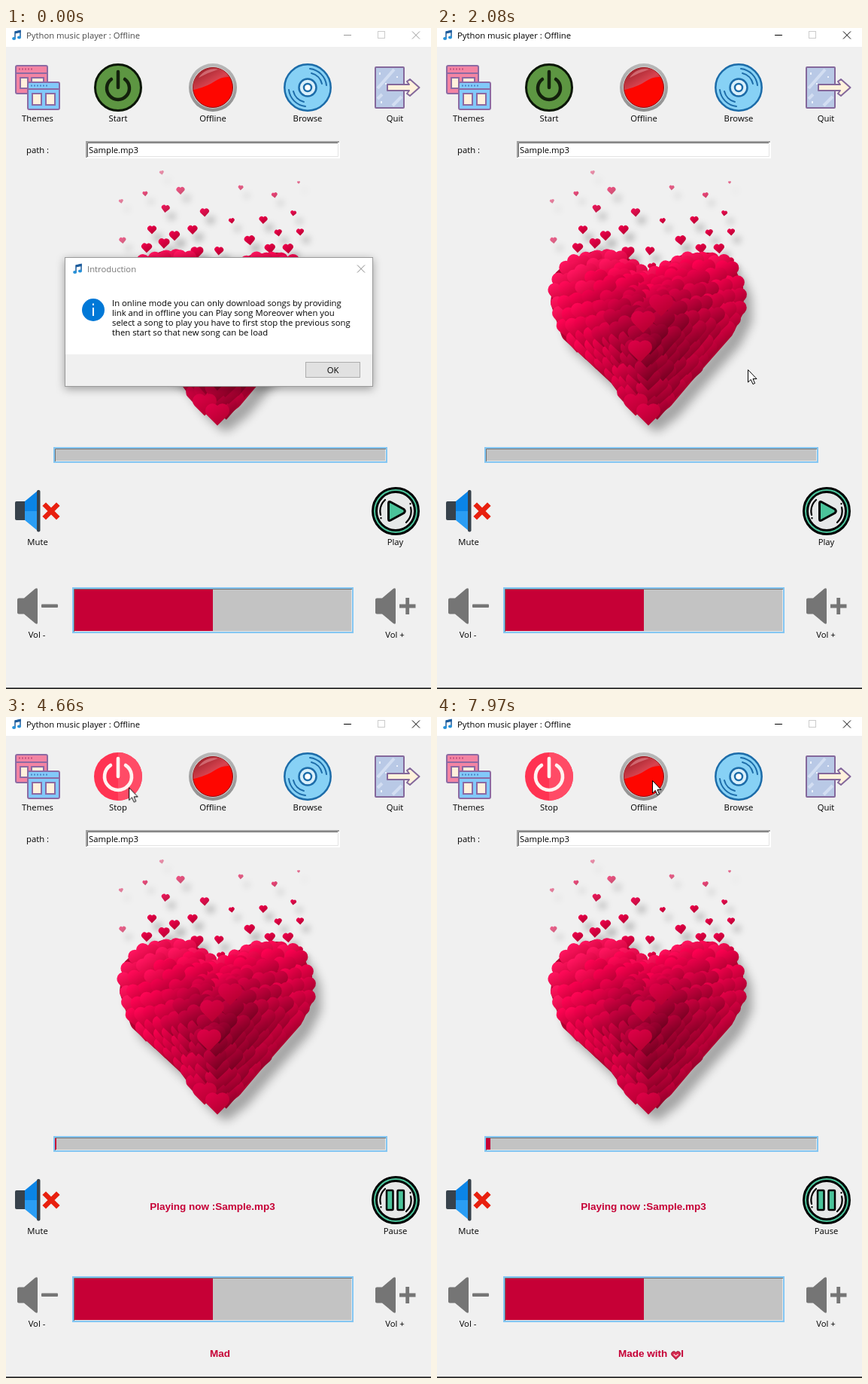
Write an HTML page with a canvas that moves like this. It is 565x877 px and loops after 8000 ms.

```html
<!DOCTYPE html>
<html lang="en">
<head>
<meta charset="utf-8">
<title>Python music player</title>
<style>
html, body { margin: 0; width: 100%; height: 100%; overflow: hidden; background: #f0f0f0; }
canvas, svg.stage { position: absolute; left: 0; top: 0; }
text { font: 11.3px "Open Sans", "Noto Sans", sans-serif; }
.mid { text-anchor: middle; }
.bold, #credit { font: bold 13.5px "Liberation Sans", Arial, sans-serif; fill: #c60036; color: #c60036; }
#credit { position: absolute; left: 284.5px; top: 836px; line-height: 17px; white-space: pre; transform: translateX(-50%); }
#credit svg { width: 14px; height: 13px; vertical-align: -4px; }
.wake { fill: currentColor; animation: wake 8s step-end infinite; }
.dialog { transform-origin: 282.5px 389.5px; animation: dismiss 8s step-end infinite; }
.frame { filter: drop-shadow(0 3px 6px rgba(0,0,0,.35)); }
.ok { animation: hover 8s step-end infinite; }
.cursor { animation: travel 8s linear infinite; }
@keyframes wake { 0% { color: var(--idle); } 24.1%, 100% { color: #000; } }
@keyframes hover {
  0% { fill: #e1e1e1; stroke: #adadad; }
  16.5%, 100% { fill: #e5f1fb; stroke: #0078d7; }
}
@keyframes dismiss {
  0% { opacity: 1; transform: none; }
  22.25% { opacity: .93; transform: scale(.995); }
  24.1% { opacity: .56; transform: scale(.98); }
  25% { opacity: .25; transform: scale(.965); }
  26%, 100% { opacity: 0; transform: scale(.95); }
}
@keyframes travel {
  0%, 3.37% { transform: translate(310px, 843px); }
  6.25% { transform: translate(338px, 765px); }
  9.4% { transform: translate(420px, 605px); }
  11.25% { transform: translate(441px, 530px); }
  13.4% { transform: translate(417px, 472px); }
  15.4% { transform: translate(408px, 464px); }
  19.25% { transform: translate(413px, 453px); }
  31.3% { transform: translate(413px, 453px); animation-timing-function: ease-in-out; }
  40.9%, 57.5% { transform: translate(150px, 91px); }
  60.4% { transform: translate(200px, 100px); }
  65% { transform: translate(395px, 104px); }
  68.1% { transform: translate(482px, 135px); }
  70% { transform: translate(487px, 145px); }
  72% { transform: translate(443px, 150px); }
  76.75%, 79.2% { transform: translate(392px, 148px); }
  88.6% { transform: translate(300px, 99px); }
  94.9% { transform: translate(288px, 86px); }
  99.6%, 100% { transform: translate(286px, 84px); }
}
</style>
</head>
<body>
<canvas id="art" width="565" height="877"></canvas>
<svg class="stage" width="565" height="877" viewBox="0 0 565 877">
  <defs>
    <g id="note">
      <path d="M4 10.500V2L11 .5V9" fill="none" stroke="#1d5c9c" stroke-width="1.500"/>
      <path d="M4 1.500 11.700 0V3L4 4.500z" fill="#1d5c9c"/>
      <ellipse cx="2.600" cy="11" rx="2.500" ry="2" fill="#2590d8"/>
      <ellipse cx="9.500" cy="9.500" rx="2.500" ry="2" fill="#2590d8"/>
    </g>
    <g id="speaker" fill="#757575">
      <path d="M0 15.500a2 2 0 0 1 2-2H9L24 .8Q27-1 27 2V46Q27 49 24 47L9 34.500H2a2 2 0 0 1-2-2z"/>
    </g>
    <g id="dial">
      <circle r="30.500" fill="#4bc39a" stroke="#000" stroke-width="3"/>
      <circle r="25.500" fill="#e6e8e8" stroke="#000" stroke-width="3"/>
      <path d="M-20 5A21 21 0 0 1-14-15M20-5A21 21 0 0 1 14 15M-19.500 9v.5M19.500-10v.5" fill="none" stroke="#000" stroke-width="2.200" stroke-linecap="round"/>
    </g>
    <linearGradient id="rim" x2="0" y2="1"><stop stop-color="#b9b9b9"/><stop offset="1" stop-color="#8d8d8d"/></linearGradient>
    <linearGradient id="gloss" x2="1" y2="1"><stop stop-color="#8e1820"/><stop offset=".6" stop-color="#d84450"/><stop offset="1" stop-color="#c81016"/></linearGradient>
  </defs>

  <!-- title bar -->
  <rect width="565" height="25" fill="#fff"/>
  <use href="#note" x="8" y="3"/>
  <text class="wake" style="--idle:#484848" x="27" y="14">Python music player : Offline</text>
  <g class="wake" style="--idle:#999;fill:none" stroke="currentColor">
    <path d="M449 9.500h10M540 4.500l10 10M550 4.500l-10 10"/>
  </g>
  <rect x="494.500" y="4.500" width="9" height="9" fill="none" stroke="#ccc"/>
  <rect y="875.300" width="565" height="2" fill="#222"/>

  <!-- themes -->
  <g stroke="#8c6aa3" stroke-width="2">
    <rect x="13" y="50" width="42" height="37" rx="2" fill="#f384a3"/>
    <path d="M13 60h42" /><path d="M17 54.500h20" stroke="#c34f7f" stroke-dasharray="2 2"/>
    <path d="M19 66h10v14H19zM34 66h16v14H34z" fill="#fff0dc"/>
    <rect x="29" y="72" width="42" height="36" rx="2" fill="#82c9fa"/>
    <path d="M29 81h42"/><path d="M33 76.500h22" stroke="#4e86c6" stroke-dasharray="2 2"/>
    <path d="M35 87h12v15H35zM53 87h12v15H53z" fill="#fff0dc"/>
  </g>
  <text class="mid" x="42" y="124">Themes</text>

  <!-- start / stop -->
  <g data-to="3420">
    <circle cx="149" cy="79" r="30.500" fill="#5d9642" stroke="#0b1607" stroke-width="3"/>
    <path d="M140 68A15 15 0 1 0 158 68M149 58V79" fill="none" stroke="#13200c" stroke-width="4.500" stroke-linecap="round"/>
    <text class="mid" x="149" y="124">Start</text>
  </g>
  <g data-from="3420">
    <circle cx="149" cy="79" r="32" fill="#ff3352"/>
    <path d="M149 47a32 32 0 0 1 0 64z" fill="#ff4b66"/>
    <path d="M139 64A18 18 0 1 0 159 64M149 55V79" fill="none" stroke="#fff2f0" stroke-width="4.600" stroke-linecap="round"/>
    <text class="mid" x="149" y="124">Stop</text>
  </g>

  <!-- offline -->
  <circle cx="275" cy="79" r="32" fill="url(#rim)"/>
  <circle cx="275" cy="79" r="28" fill="#d0d0d0"/>
  <circle cx="275" cy="79" r="26.500" fill="#fe0600" stroke="#8a1014"/>
  <path d="M249 82A26 26 0 0 1 297 65Q287 64 277 71T249 82z" fill="url(#gloss)"/>
  <path d="M256 66A24 24 0 0 1 282 55Q269 59 256 66z" fill="#e58e94" opacity=".6"/>
  <text class="mid" x="275" y="124">Offline</text>

  <!-- browse -->
  <g fill="none" stroke="#1c6ca9" stroke-width="2.500">
    <circle cx="401" cy="79" r="30.700" fill="#87d1f5"/>
    <circle cx="401" cy="79" r="11.500" fill="#d9effa"/>
    <circle cx="401" cy="79" r="5" fill="#fff"/>
    <path d="M404 54A25 25 0 0 1 426 76M406 60A19 19 0 0 1 420 74M398 104A25 25 0 0 1 376 82M396 98A19 19 0 0 1 382 84" stroke-width="2" stroke-linecap="round"/>
  </g>
  <text class="mid" x="401" y="124">Browse</text>

  <!-- quit -->
  <g stroke="#84689b" stroke-width="2" stroke-linejoin="round">
    <rect x="491" y="52" width="38" height="54" rx="1" fill="#b9c9e6"/>
    <path d="M494 80 516 55M494 94 500 88M514 103 526 91" stroke="#d3def2" stroke-width="4"/>
    <path d="M497 59v3M520 64v2M499 97v3M505 73v2" stroke="#edf2fb"/>
    <path d="M507 75h29l-3-4 4-3 12.500 11-12.500 11-4-3 3-4H507z" fill="#fff2dc"/>
  </g>
  <text class="mid" x="517" y="124">Quit</text>

  <!-- path entry -->
  <text x="27" y="166">path :</text>
  <rect x="106" y="150" width="338" height="23" fill="#fff"/>
  <path d="M106 172V150H443V152H108V172z" fill="#a0a0a0"/>
  <path d="M108.500 171V152.500H441" fill="none" stroke="#696969"/>
  <path d="M109 170.500H441.500V153" fill="none" stroke="#e3e3e3"/>
  <text x="110" y="166">Sample.mp3</text>

  <!-- song progress -->
  <rect x="64" y="557" width="442" height="19" fill="#c3c3c3" stroke="#84c6f2" stroke-width="2"/>
  <path d="M65.500 575V558.500H505" fill="none" stroke="#707070"/>
  <path d="M66 574.500H504.500V559" fill="none" stroke="#e6e6e6"/>
  <rect id="played" x="65" y="559" width="0" height="15" fill="#c60036"/>

  <!-- mute -->
  <path d="M12 630q0-2 2-2H25V653H14q-2 0-2-2z" fill="#37424c"/>
  <path d="M25 628 42 614V641H25z" fill="#0a84e6"/>
  <path d="M25 641H42V667L25 653z" fill="#2a9df4"/>
  <rect x="41" y="613" width="4.500" height="55.500" rx="2" fill="#37424c"/>
  <path d="M53 634 67 648M67 634 53 648" stroke="#e8200f" stroke-width="6.500" stroke-linecap="square"/>
  <text class="mid" x="42" y="686">Mute</text>

  <!-- play / pause -->
  <use href="#dial" x="518" y="641"/>
  <g data-to="3580">
    <path d="M508.500 630.500Q508.500 627.500 511.500 629L529 638.500Q531.500 641 529 643.500L511.500 653Q508.500 654.500 508.500 651.500z" fill="#4bc39a" stroke="#000" stroke-width="3" stroke-linejoin="round"/>
    <text class="mid" x="517.500" y="686">Play</text>
  </g>
  <g data-from="3580">
    <g fill="#4bc39a" stroke="#000" stroke-width="2.500">
      <rect x="506" y="628" width="8.500" height="26" rx="1"/>
      <rect x="520.500" y="628" width="8.500" height="26" rx="1"/>
    </g>
    <text class="mid" x="517.500" y="686">Pause</text>
    <text class="mid bold" x="274.500" y="654">Playing now :Sample.mp3</text>
  </g>

  <!-- volume -->
  <use href="#speaker" x="15" y="743"/>
  <rect x="47" y="764.500" width="22" height="4.500" rx="1" fill="#757575"/>
  <text class="mid" x="41" y="809">Vol -</text>
  <use href="#speaker" x="491" y="743"/>
  <path d="M523 767h21.500M533.700 756v22" stroke="#757575" stroke-width="4.800"/>
  <text class="mid" x="517" y="809">Vol +</text>
  <rect x="89" y="743" width="372" height="59" fill="#c3c3c3" stroke="#84c6f2" stroke-width="2"/>
  <path d="M90.500 801V744.500H460" fill="none" stroke="#707070"/>
  <path d="M91 800.500H459.500V745" fill="none" stroke="#e6e6e6"/>
  <rect x="91" y="745" width="184" height="55" fill="#c60036"/>

  <!-- introduction dialog -->
  <g class="dialog">
    <rect class="frame" x="78.500" y="304.500" width="409" height="171" fill="#fff" stroke="#9a9a9a"/>
    <rect x="79" y="433" width="408" height="42" fill="#f0f0f0"/>
    <use href="#note" x="89" y="313"/>
    <text x="108" y="324" fill="#777">Introduction</text>
    <path d="M467 314.500l10 10M477 314.500l-10 10" stroke="#888"/>
    <circle cx="116" cy="374" r="15" fill="#0078d7"/>
    <path d="M116 371V382M116 365.500V368" stroke="#fff" stroke-width="2"/>
    <text x="141" y="369">In online mode you can only download songs by providing</text>
    <text x="141" y="382">link and in offline you can Play song Moreover when you</text>
    <text x="141" y="395">select a song to play you have to first stop the previous song</text>
    <text x="141" y="408">then start so that new song can be load</text>
    <rect class="ok" x="398.500" y="443.500" width="72" height="20"/>
    <text class="mid" x="434.500" y="458">OK</text>
  </g>
</svg>

<div id="credit"><span id="typed"></span><svg id="gift" viewBox="0 0 14 13"><path d="M7 12.500 1.500 7A3 3 0 0 1 7 3 3 3 0 0 1 12.500 7z" fill="#d5294f" stroke="#8c1a36" stroke-width=".8"/><path d="M4 5.500 7 8l3-2.500" fill="none" stroke="#ffd9de" stroke-width="1.300"/></svg><span id="tail">I</span></div>

<svg class="stage" width="565" height="877">
  <g class="cursor"><path data-from="270" d="M.5.500V17l3.800-3.600L7 19.500l2.600-1.100L7 12.500h5z" fill="#fff" stroke="#000"/></g>
</svg>

<script>
const byId = id => document.getElementById(id);
const ctx = byId('art').getContext('2d');

let seed = 11;
const random = () => (seed = (seed * 16807) % 2147483647) / 2147483647;

function heart(x, y, size, lightness, depth, angle = 0) {
  const c = size * .207, r = size * .293, q = size * .04;
  ctx.save();
  ctx.translate(x, y);
  ctx.rotate(angle);
  const shade = ctx.createLinearGradient(-size * .3, -size * .4, size * .25, size * .45);
  shade.addColorStop(0, `hsl(341 100% ${lightness}%)`);
  shade.addColorStop(1, `hsl(344 100% ${lightness - depth}%)`);
  ctx.fillStyle = shade;
  ctx.beginPath();
  ctx.arc(-c, q - c, r, Math.PI * .75, Math.PI * 1.75);
  ctx.arc(c, q - c, r, Math.PI * 1.25, Math.PI * 2.25);
  ctx.lineTo(0, q + 2 * c);
  ctx.fill();
  ctx.restore();
}

function setShadow(alpha, blur, dx, dy) {
  Object.assign(ctx, { shadowColor: `rgba(0,0,0,${alpha})`, shadowBlur: blur, shadowOffsetX: dx, shadowOffsetY: dy });
}

const outline = [
  [281, 511], [262, 494], [240, 464], [210, 436], [176, 405], [162, 364], [166, 332], [182, 317],
  [212, 306], [245, 312], [266, 328], [288, 338], [305, 324], [330, 311], [360, 309], [385, 321],
  [396, 345], [397, 374], [383, 402], [360, 428], [330, 462], [303, 494]
];

// Evenly spaced points along the outline, shrunk towards its middle.
function ring(scale, gap) {
  const points = [];
  let carry = 0;
  outline.forEach(([ax, ay], i) => {
    const [bx, by] = outline[(i + 1) % outline.length];
    const length = Math.hypot(bx - ax, by - ay) * scale;
    for (; carry < length; carry += gap) {
      const k = carry / length;
      points.push([278 + (ax + (bx - ax) * k - 278) * scale, 400 + (ay + (by - ay) * k - 400) * scale]);
    }
    carry -= length;
  });
  return points.sort((a, b) => a[1] - b[1]);
}

function drawHeart() {
  ctx.beginPath();
  outline.forEach(p => ctx.lineTo(...p));
  ctx.closePath();
  ctx.lineJoin = 'round';
  ctx.lineWidth = 22;
  ctx.strokeStyle = ctx.fillStyle = '#b00030';
  setShadow(.32, 13, 11, 13);
  ctx.stroke();
  setShadow(0, 0, 0, 0);
  ctx.fill();
  for (const scale of [1, .87, .74, .61, .48, .35, .2]) {
    for (const [px, py] of ring(scale, 17)) {
      const x = px + (random() - .5) * 5, y = py + (random() - .5) * 5;
      const light = 38 + 15 * scale - 13 * (y - 310) / 200 - 4 * (x - 280) / 120 + random() * 4;
      heart(x, y, 31, Math.min(54, light), 16, (random() - .5) * .2);
    }
  }
  for (const [x, y] of [[264, 500], [281, 513], [298, 368], [274, 390], [270, 429]]) heart(x, y, 32, 43, 8);
}

function drawSparks() {
  const sparks = [
    [207, 192, 6], [232, 216, 11], [185, 220, 7], [153, 230, 6], [212, 240, 11], [264, 245, 12], [194, 268, 12],
    [224, 276, 14], [248, 268, 13], [155, 282, 9], [300, 256, 8], [312, 212, 7], [357, 222, 8], [389, 205, 4],
    [342, 255, 11], [382, 246, 8], [391, 271, 10], [362, 272, 10], [324, 282, 14], [283, 296, 12], [210, 286, 15],
    [187, 292, 14], [254, 298, 17], [351, 293, 14], [375, 293, 14], [388, 310, 13], [286, 317, 11]
  ];
  for (const [x, y, size] of sparks) {
    ctx.globalAlpha = Math.min(1, .4 + (y - 190) / 100) * (x < 160 ? .6 : 1);
    setShadow(.25, 8, 8, 11);
    heart(x, y, size, 46, 10, (random() - .5) * .4);
  }
  ctx.globalAlpha = 1;
  setShadow(0, 0, 0, 0);
}

drawSparks();
drawHeart();

const keyTimes = [3580, 3970, 4350, 4750, 5150, 5560, 5960, 6370, 6770, 7180, 7590, 7970];
const timed = document.querySelectorAll('[data-from], [data-to]');

function render() {
  const t = performance.now() % 8000;
  for (const el of timed) {
    const { from = 0, to = 8000 } = el.dataset;
    el.style.visibility = t >= +from && t < +to ? 'visible' : 'hidden';
  }
  const typed = keyTimes.filter(time => t >= time).length;
  byId('typed').textContent = 'Made with '.slice(0, typed);
  byId('gift').style.display = typed > 10 ? 'inline' : 'none';
  byId('tail').style.display = typed > 11 ? 'inline' : 'none';
  byId('played').setAttribute('width', t < 4350 ? 0 : 2 + Math.floor((t - 4350) / 847));
  requestAnimationFrame(render);
}
render();
</script>
</body>
</html>
```
